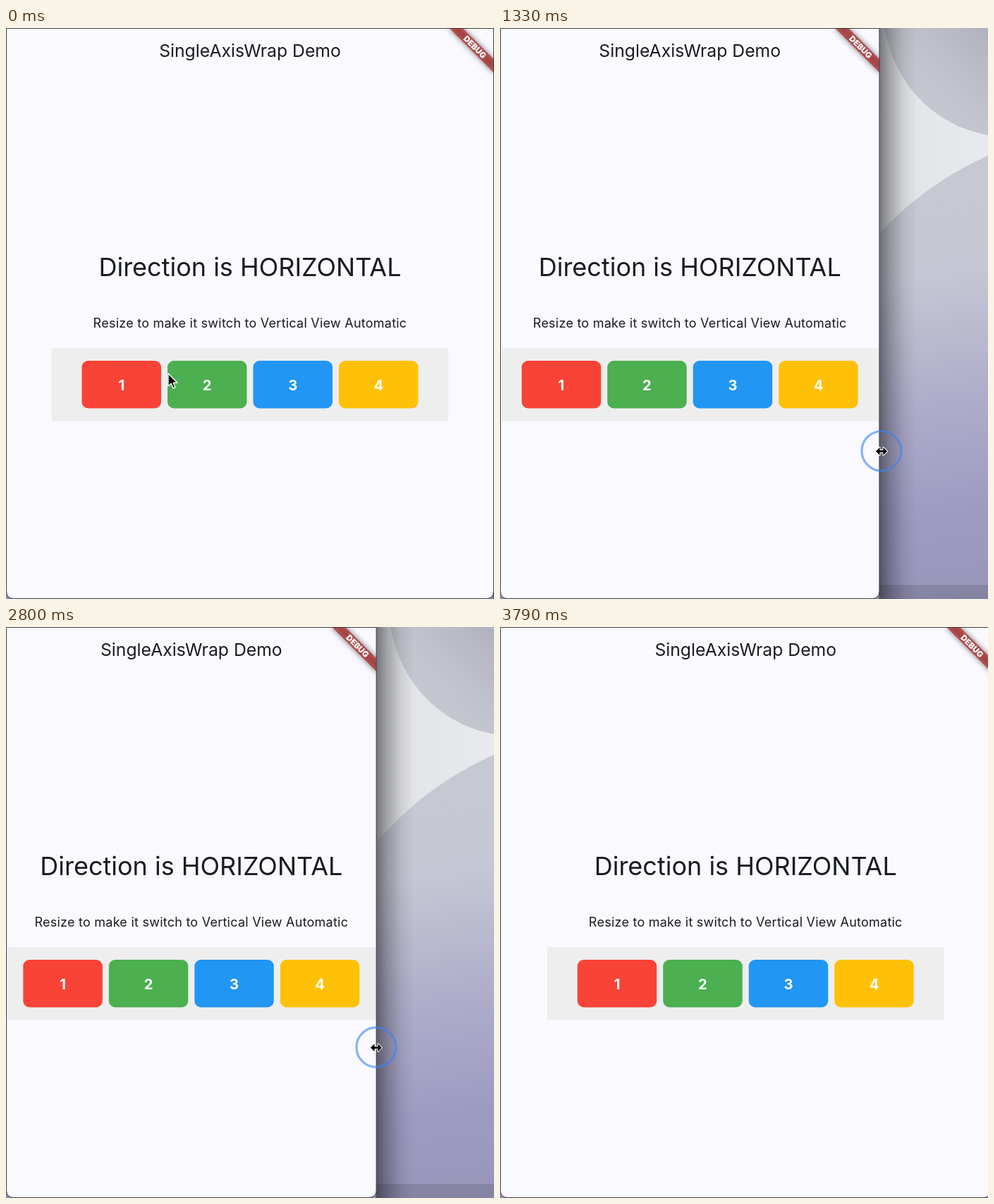
Recreate the animation shown at these times as an HTML page. Size 692 by 810 pixels, loop 3910 ms.

```html
<!DOCTYPE html>
<html lang="en">
<head>
<meta charset="utf-8">
<title>SingleAxisWrap Demo</title>
<style>
  html, body { margin: 0; width: 100%; height: 100%; overflow: hidden; }
  svg { display: block; width: 100vw; height: 100vh; }
  text {
    font-family: Inter, Roboto, sans-serif;
    font-optical-sizing: none;
    text-anchor: middle;
    fill: #191c20;
  }
  .title { font-size: 24.75px; }
  .heading { font-size: 36px; }
  .hint { font-size: 18px; letter-spacing: .24px; }
  .number { font-size: 20.25px; font-weight: 700; fill: #fff; }
  .debug { font-size: 11.5px; font-weight: 900; fill: #fff; }
</style>
</head>
<body>
<svg viewBox="0 0 692 810">
  <defs>
    <linearGradient id="upper" x1="0" y1="1" x2="1" y2="0">
      <stop offset="0" stop-color="#c9cbd3"/>
      <stop offset=".5" stop-color="#c3c5ce"/>
      <stop offset="1" stop-color="#b1b2bf"/>
    </linearGradient>
    <linearGradient id="lower" gradientUnits="userSpaceOnUse" x1="560" y1="200" x2="650" y2="810">
      <stop offset="0" stop-color="#c6c9d1"/>
      <stop offset=".25" stop-color="#c5c7d4"/>
      <stop offset=".55" stop-color="#aeacca"/>
      <stop offset=".8" stop-color="#9e9bc2"/>
      <stop offset="1" stop-color="#9996ba"/>
    </linearGradient>
    <linearGradient id="light" x1="0" x2="1">
      <stop offset="0" stop-color="#c9cbd3"/>
      <stop offset=".45" stop-color="#e3e4e8"/>
      <stop offset="1" stop-color="#e9eaed"/>
    </linearGradient>
    <linearGradient id="shade">
      <stop offset="0" stop-color="#000" stop-opacity=".46"/>
      <stop offset=".3" stop-color="#000" stop-opacity=".25"/>
      <stop offset=".65" stop-color="#000" stop-opacity=".08"/>
      <stop offset="1" stop-color="#000" stop-opacity="0"/>
    </linearGradient>
    <filter id="blur" x="-50%" y="-200%" width="200%" height="500%">
      <feGaussianBlur stdDeviation="4"/>
    </filter>
    <clipPath id="clip"><path class="frame"/></clipPath>
  </defs>

  <!-- wallpaper -->
  <rect width="692" height="810" fill="url(#lower)"/>
  <path d="M480 0H692V181Q580 232 510 325L480 370Z" fill="url(#light)"/>
  <path d="M545 0C560 80 615 138 692 152V0Z" fill="url(#upper)"/>
  <rect id="shadow" width="54" height="810" fill="url(#shade)"/>
  <path d="M0 790H692V810H0Z" fill="#000" opacity=".12"/>

  <!-- app window -->
  <g clip-path="url(#clip)">
    <rect width="760" height="810" fill="#f9f9ff"/>
    <g id="content">
      <text class="title" y="41">SingleAxisWrap Demo</text>
      <g id="labels">
        <text class="heading" id="heading" y="352"></text>
        <text class="hint" y="425">Resize to make it switch to Vertical View Automatic</text>
      </g>
      <rect id="panel" fill="#eee"/>
      <g id="tiles"></g>
    </g>
    <g id="banner">
      <g transform="rotate(45) scale(1.125)">
        <rect x="-40" y="28" width="80" height="12" opacity=".5" filter="url(#blur)"/>
        <rect x="-40" y="28" width="80" height="12" fill="#b71c1c" fill-opacity=".63"/>
      </g>
      <text class="debug" transform="rotate(45)" y="42.4">DEBUG</text>
    </g>
  </g>
  <path class="frame" fill="none" stroke="#3c3c46"/>

  <!-- pointer -->
  <g id="pointer" stroke="#fff" stroke-linejoin="round">
    <path id="arrow" stroke-width="1.4" d="M0 0V18L4.2 14.2 7 21 10 19.7 7.2 13.2H13Z"/>
    <g id="resize">
      <circle id="ring" r="28" fill="none" stroke="#3b82f6" stroke-width="3.2" stroke-opacity=".6"/>
      <path stroke-width="2" paint-order="stroke" d="M-8 .5L-2.5-5V-1H2.5V-5L8 .5 2.5 6V2H-2.5V6Z"/>
    </g>
  </g>
</svg>
<script>
const LOOP = 3910, FRAME = 1000 / 15;
const TILE_W = 112.5, TILE_H = 67.5, GAP = 9, PAD = 18;
const SWITCH_WIDTH = 518;
const COLORS = ['#f94336', '#4caf50', '#2196f3', '#ffc107'];

// time, window width, pointer x, pointer y
const KEYS = [
  [0, 692, 230, 490],
  [67, 692, 236, 496],
  [333, 692, 610, 667],
  [467, 692, 691, 645],
  [600, 690, 693, 603],
  [733, 655, 657, 593],
  [1067, 588, 590, 598],
  [1333, 538.5, 541, 600],
  [1600, 514, 516, 599],
  [1733, 510.5, 512, 598],
  [2067, 511, 512, 598],
  [2200, 511, 512, 598],
  [2333, 514, 513.5, 596.5],
  [2533, 516, 516, 596.5],
  [2667, 517, 517, 596.5],
  [2867, 530, 529, 596],
  [3000, 561, 560.5, 595.5],
  [3133, 647, 643, 596],
  [3200, 676, 674, 596],
  [3333, 694, 697, 596],
  [3533, 696.5, 740, 596],
  [LOOP, 696.5, 740, 596]
];

const $ = id => document.getElementById(id);
const set = (el, attrs) => {
  for (const name in attrs) el.setAttribute(name, attrs[name]);
};
const move = (el, x, y) => set(el, { transform: `translate(${x} ${y})` });
const show = (el, on) => { el.style.display = on ? '' : 'none'; };

$('tiles').innerHTML = COLORS.map((color, i) => `<g>
  <rect width="${TILE_W}" height="${TILE_H}" rx="9" fill="${color}"/>
  <text class="number" x="${TILE_W / 2}" y="41.5">${i + 1}</text></g>`).join('');
const tiles = [...$('tiles').children];
const frames = document.querySelectorAll('.frame');

function sample(time) {
  const i = Math.max(1, KEYS.findIndex(key => key[0] > time));
  const a = KEYS[i - 1], b = KEYS[i];
  const p = (time - a[0]) / (b[0] - a[0]);
  return a.slice(1).map((v, k) => v + (b[k + 1] - v) * p);
}

function layout(width) {
  const vertical = width < SWITCH_WIDTH;
  const top = vertical ? 339 : 454;
  const panelWidth = Math.min(562.5, width);
  const rowWidth = 4 * TILE_W + 3 * GAP;

  move($('content'), width / 2, 0);
  move($('labels'), 0, top - 454);
  $('heading').textContent = 'Direction is ' + (vertical ? 'VERTICAL' : 'HORIZONTAL');
  set($('panel'), {
    x: -panelWidth / 2, y: top, width: panelWidth,
    height: 2 * PAD + (vertical ? 4 * TILE_H + 3 * GAP : TILE_H)
  });
  tiles.forEach((tile, i) => vertical
    ? move(tile, -TILE_W / 2, top + PAD + i * (TILE_H + GAP))
    : move(tile, -rowWidth / 2 + i * (TILE_W + GAP), top + PAD));

  const d = `M.5 .5H${width - .5}V798.5q0 11-11 11H11.5q-11 0-11-11Z`;
  frames.forEach(path => set(path, { d }));
  move($('banner'), width, 0);
  set($('shadow'), { x: width - 1 });
}

function draw(now) {
  const elapsed = now % LOOP;
  const time = Math.floor((elapsed + 5) / FRAME) * FRAME;
  const [width, x, y] = sample(Math.min(time, LOOP - 1));
  layout(width);
  move($('pointer'), x, y);
  const atEdge = time > 460;
  show($('arrow'), !atEdge);
  show($('resize'), atEdge);
  show($('ring'), time > 520);
}

const start = performance.now();
function tick() {
  draw(performance.now() - start);
  requestAnimationFrame(tick);
}
tick();
</script>
</body>
</html>
```
